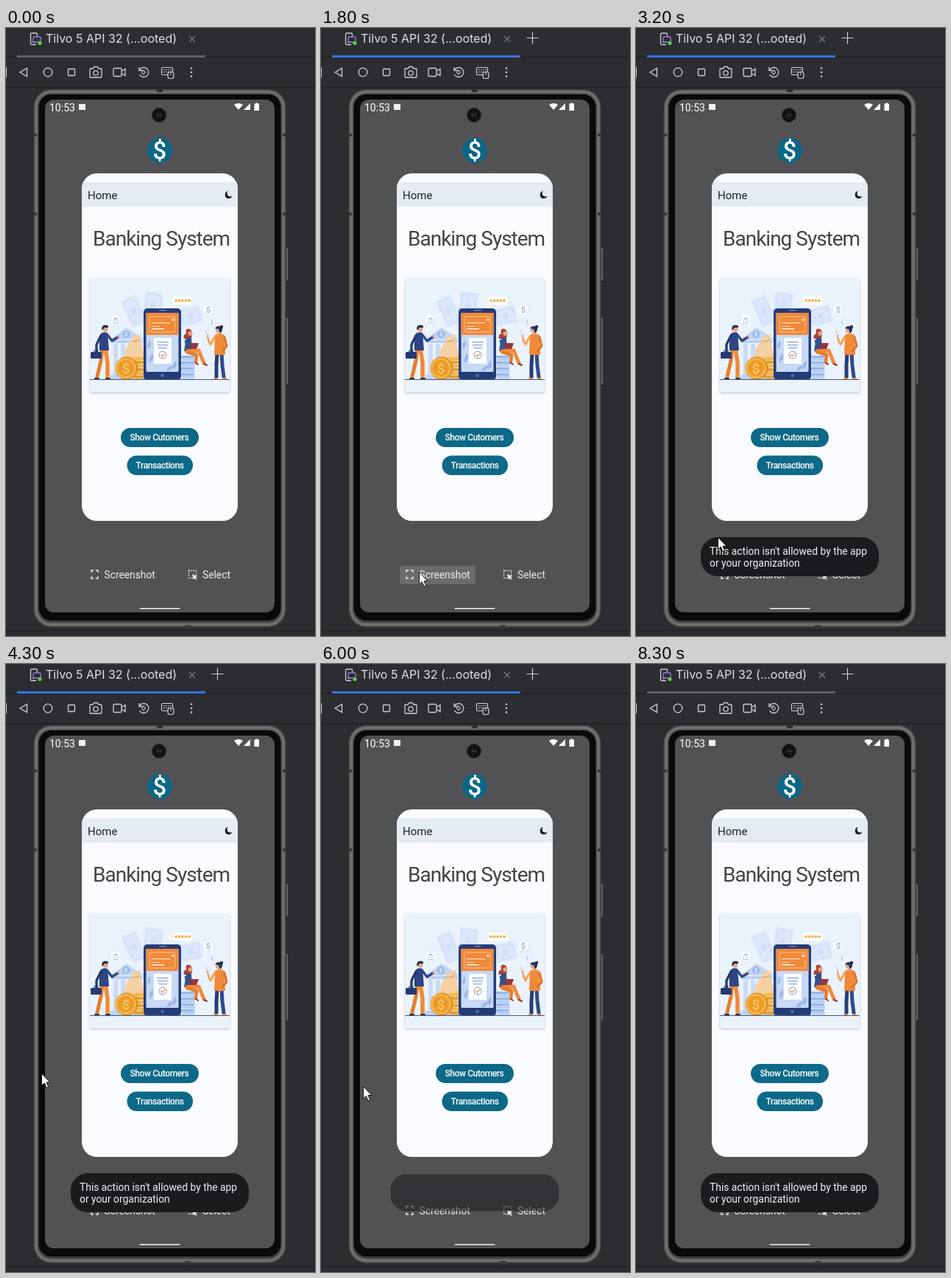
An HTML page with a canvas for the animation above (8400 ms loop, 420x824 px).

```html
<!DOCTYPE html>
<html lang="en">
<head>
<meta charset="utf-8">
<title>Emulator</title>
<style>
html, body { margin: 0; width: 100%; height: 100%; overflow: hidden; background: #2b2d30; }
canvas { display: block; width: 420px; height: 824px; }
</style>
</head>
<body>
<canvas id="stage" width="420" height="824"></canvas>
<script>
const W = 420, H = 824, LOOP = 8400, STEP = 100;
const ROBOTO = 'Roboto, "Noto Sans", sans-serif';
const INTER = 'Inter, "Noto Sans", sans-serif';
const NAVY = '#263c78', ORANGE = '#f08a3a', GOLD = '#f2a630', SKIN = '#e8a282';
const view = document.getElementById('stage').getContext('2d');
const backdrop = document.createElement('canvas');
backdrop.width = W;
backdrop.height = H;
let c = backdrop.getContext('2d');

const clamp = v => Math.max(0, Math.min(1, v));
const smooth = v => v * v * (3 - 2 * v);

function paint(fill, stroke, width = 1) {
  if (fill) { c.fillStyle = fill; c.fill(); }
  if (stroke) { c.strokeStyle = stroke; c.lineWidth = width; c.stroke(); }
}
function box(x, y, w, h, r, fill, stroke, width) {
  c.beginPath();
  c.roundRect(x, y, w, h, r);
  paint(fill, stroke, width);
}
function disc(x, y, r, fill, stroke, width) {
  c.beginPath();
  c.arc(x, y, r, 0, 7);
  paint(fill, stroke, width);
}
function shape(d, fill, stroke, width) {
  const p = new Path2D(d);
  if (fill) { c.fillStyle = fill; c.fill(p); }
  if (stroke) { c.strokeStyle = stroke; c.lineWidth = width || 1; c.stroke(p); }
}
function text(s, x, y, font, color, align = 'left', spacing = 0) {
  c.font = font;
  c.fillStyle = color;
  c.textAlign = align;
  c.letterSpacing = spacing + 'px';
  c.fillText(s, x, y);
}
function turned(x, y, angle, draw) {
  c.save();
  c.translate(x, y);
  c.rotate(angle);
  draw();
  c.restore();
}

function drawIde() {
  box(0, 0, W, H, 0, '#2b2d30');
  for (const y of [39, 80, 816]) box(0, y, W, 1.3, 0, '#1e1f22');

  // device tab
  shape('M41 22.5H35Q33.500 22.5 33.500 21V8.500Q33.500 7 35 7H41Q42.500 7 42.500 8.500V11', null, '#ced0d6', 1.3);
  box(36, 18.500, 4, 1.3, 0, '#ced0d6');
  box(37, 12, 10, 7, 1, '#2b2d30', '#9a78e0', 1.3);
  disc(46, 20.500, 2.6, '#57d13f');
  text('Tilvo 5 API 32 (...ooted)', 54, 20, '16px ' + INTER, '#dfe1e5');
  shape('M249 11l8 8m0-8l-8 8', null, '#777a80', 1.2);

  // toolbar
  const ink = '#ced0d6';
  box(0, 53, 1, 14, 0, ink);
  shape('M19 60L28.500 54.500V65.500Z', null, ink, 1.3);
  disc(57, 60, 5.8, null, ink, 1.3);
  box(84.5, 55.5, 9, 9, 1, null, ink, 1.3);
  shape('M115 55H118L120 52.500H124L126 55H129Q130 55 130 56V66Q130 67 129 67H115Q114 67 114 66V56Q114 55 115 55Z', null, ink, 1.3);
  disc(122, 61, 3.2, null, ink, 1.3);
  box(146, 54.5, 11, 11, 1.5, null, ink, 1.3);
  shape('M157 58.500L162 55.500V64.500L157 61.500', null, ink, 1.3);
  shape('M181 53V57.500H185.500M181.500 57A6.500 6.500 0 1 1 181.500 63', null, ink, 1.3);
  shape('M187 57L189.500 60L187 63L184.500 60Z', null, ink, 1.1);
  box(211.5, 53.5, 15, 10, 1.5, null, ink, 1.2);
  for (let i = 0; i < 8; i++) box(214 + i % 4 * 3, 56 + (i >> 2) * 3, 1.5, 1.3, 0, ink);
  box(220, 59.5, 8, 9, 3, '#2b2d30', ink, 1.2);
  shape('M224 60V64', null, ink);
  for (const y of [54.5, 60, 65.5]) disc(252, y, 1.3, ink);
}

function drawPhone() {
  for (const [y, h] of [[298, 44], [393, 90]]) {
    box(379, y, 4, h, 1, '#6a6b6c');
    box(380, y + 1, 1.3, h - 2, 0, '#292a2c');
  }
  // rounded metal rim: dark at both edges, bright between
  const rim = 7;
  for (let i = 0; i < rim; i += .5) {
    const v = Math.round(52 + 62 * Math.sin(Math.PI * (i + .5) / (rim + .5)));
    box(37.5 + i, 83 + i, 343 - 2 * i, 729 - 2 * i, 24 - i, `rgb(${v},${v},${v})`);
  }
  box(44.5, 90, 329, 713, 17, '#0a0a0b');
  for (const y of [143, 250]) for (const x of [38, 376]) box(x, y, 4, 4, 0, '#38393a');
  box(205, 83, 8, 4, 0, '#303132');
  box(243, 809, 8, 5, 0, '#38393a');
  box(53, 97, 312, 695, 12, '#525255');

  // status bar
  text('10:53', 59, 112.5, '14px ' + ROBOTO, '#fff');
  box(99, 103, 9, 8, 0, '#f2f2f2');
  shape('M310 104Q316 100 322 104L316 111Z', '#fff');
  shape('M332 102V111H323Z', '#fff');
  shape('M339.500 101.500H342V102.500H344V112H337.500V102.500H339.500Z', '#fff');
  disc(208, 118, 9.5, '#101113', '#29292b', 1);
  disc(208, 118, 5, '#18191b');
  disc(206, 118, 1, '#4b4c50');
  disc(210, 118, 1, '#3f4044');

  disc(209, 166, 17, '#0c6685');
  text('$', 209, 177.5, '500 33px ' + ROBOTO, '#fff', 'center');
  box(181.5, 786, 55, 1.6, .8, '#f1f1f1');
}

function bill(x, y, w, h, angle) {
  turned(x, y, angle, () => {
    box(-w / 2, -h / 2, w, h, 1, '#dbe7fa');
    box(-w / 2 + 3, -h / 2 + 3, w - 6, h - 6, 1, null, '#cddcf6', .8);
    disc(0, 0, 4, '#d0dff7');
  });
}

function drawScenery() {
  bill(174, 384, 22, 40, -.42);
  bill(200, 376, 25, 36, .12);
  bill(251, 390, 29, 24, -.22);

  // bank
  shape('M142 422L164 406L188 422Z', '#c1d5f5');
  box(144, 423, 42, 4, 0, '#b9cff2');
  for (let x = 146; x < 186; x += 10) box(x, 428, 6, 42, 0, '#cbdbf7');
  box(142, 470, 46, 6, 0, '#bcd1f3');
  disc(163, 415, 5, '#96b6eb');
  text('$', 163, 418, '500 8px ' + ROBOTO, '#fff', 'center');

  // bubbles
  disc(149, 396, 8, '#fafcff', '#dce8f8');
  shape('M145 395L149 392L153 395ZM146 396H147V399H146ZM149 396H150V399H149ZM152 396H153V399H152ZM145 400H153V401H145Z', '#a9c3ee');
  for (const [x, y, r] of [[275, 382, 8], [280, 399, 5], [272, 413, 4]]) {
    disc(x, y, r, '#f8fbff', '#dce8f8');
    text('$', x, y + r * .5, `500 ${r * 1.4}px ${ROBOTO}`, '#91b3e8', 'center');
  }
  box(227, 364, 26, 11, 2, '#fff');
  for (let i = 0; i < 5; i++) {
    const x = 231 + i * 4.5;
    shape(`M${x} 367l.8 1.5 1.500.2-1.100 1.200.3 1.700-1.500-.8-1.500.8.3-1.700-1.100-1.200 1.500-.2z`, GOLD);
  }

  // money bag and coins
  shape('M171 416L177 418L184 414L182 422Q188 436 187 448H161Q161 431 171 424Z', '#f4d0a4');
  shape('M171 424Q176 426 182 422', null, '#d69a60', 1.3);
  for (let i = 0; i < 6; i++) box(174, 446 + i * 5, 13, 4.3, 1, i % 2 ? '#eaa02c' : '#f6b846');
  disc(164, 461, 15.5, '#dd8e28');
  disc(163, 461, 14, '#f7b544');
  disc(163, 461, 11, '#e99b2b');
  text('$', 163, 468, '500 19px ' + ROBOTO, '#f9c660', 'center');
  for (let i = 0; i < 8; i++) box(238 + i % 2, 444 + i * 4, 18, 3.4, 1, i % 2 ? '#b8cff3' : '#98b8eb');

  // giant handset
  box(187, 380, 51, 97, 5, NAVY);
  box(190.5, 386, 44, 80, 1, '#c7d9f4');
  box(190.5, 386, 44, 30, 0, ORANGE);
  box(195, 391, 35, 21, 2, null, '#fad0a7', .8);
  box(198, 399, 25, 1.2, 0, '#ffe0c0');
  box(198, 404, 11, 1, 0, '#ffe0c0');
  box(198, 407, 17, 1.3, 0, '#fff');
  box(225, 394, 4, 3, 1, '#ffd7a8');
  shape('M195 454Q194 445 199 441Q202 449 195 454M228 463Q225 455 231 451Q233 459 228 463M193 435Q191 426 196 424Q198 431 193 435M218 465Q220 458 228 457Q226 464 218 465', '#98b7e9');
  box(201, 420, 24, 35, 0, '#fbfdff');
  for (let i = 0; i < 3; i++) box(205 + i, 425 + i * 4, 16 - i * 2, 1.3, 0, '#87a9df');
  disc(213, 443, 5, '#fff', '#677da8', .8);
  shape('M210.500 443L212.500 445L216 440.500', null, ORANGE, 1.2);
  disc(212.5, 471, 2.2, '#5371b5');
  box(208, 382, 10, 1.2, 0, '#7089c2');
}

function drawPeople() {
  c.lineCap = c.lineJoin = 'round';

  // man with briefcase
  shape('M131 434L129 451L124 472', null, '#e67d2d', 5);
  shape('M135 434L138 453L138 472', null, ORANGE, 5.5);
  shape('M121 475H126M136 475H141', null, '#253355', 2.2);
  shape('M129 414Q133 411 138 413L140 437H127Q126 422 129 414Z', '#2d4584');
  shape('M138 416L144 424L152 419', null, '#2d4584', 3.3);
  shape('M129 417L123 429L123 438', null, '#233768', 3.3);
  disc(153, 418, 1.7, SKIN);
  box(115, 439, 15, 9, 1.5, '#243a72');
  shape('M120 439V437H125V439', null, '#243a72', 1.2);
  disc(135, 408, 3.5, SKIN);
  shape('M130.500 410Q129 402.500 135 402.500Q140 402.500 139 406L134 406Z', '#263052');

  // seated woman with laptop
  shape('M245 414Q243 406 250 408Q255 411 252 421H244Q240 422 242 416Z', '#ad4434');
  disc(250.500, 414, 3, SKIN);
  shape('M245 420Q249 418 252 421L253 438H242Z', '#31528e');
  shape('M246 438L262 437L269 454', null, ORANGE, 4.8);
  shape('M246 439L259 443L258 453', null, '#e57c30', 4.5);
  shape('M269 455L273 457M258 454L261 456', null, '#93303a', 2);
  shape('M250 427L262 427L259 435L247 435Z', '#98343f');
  shape('M244 424L246 432L252 431', null, '#31528e', 2.6);

  // standing woman
  shape('M287 440L286 457L286 473', null, NAVY, 5);
  shape('M293 440L294 457L296 473', null, '#30498b', 5);
  shape('M283 475H287M295 475H299', null, ORANGE, 2);
  shape('M284 416Q290 412 297 416L298 443H283Z', ORANGE);
  shape('M284 418L278 429L275 423', null, '#f5a154', 2.8);
  shape('M297 419L300 431L294 438', null, '#dd762d', 3.2);
  disc(275, 421, 1.6, SKIN);
  box(273, 415, 2.2, 5, .5, '#f0a45e');
  shape('M289 410V415', null, SKIN, 2.6);
  disc(288, 409, 3.4, SKIN);
  shape('M284 407Q287 402 293 405Q296 409 291 414L289 408Z', '#263052');
  disc(293, 405, 2.2, '#263052');
  c.lineCap = 'butt';
  c.lineJoin = 'miter';
}

function drawApp() {
  c.save();
  box(103, 197, 212, 471, 20.5, '#fafbff');
  c.clip();
  box(103, 209, 212, 33, 0, '#e4ebf1');
  c.restore();
  text('Home', 111, 231.5, '15px ' + ROBOTO, '#202124');
  shape('M302 221A5 5 0 1 0 307.500 227.500A4 4 0 0 1 302 221Z', '#181a1e');
  text('Banking System', 118, 295, '28px ' + ROBOTO, '#444449', 'left', -1);

  c.save();
  c.shadowColor = 'rgba(30,40,60,.3)';
  c.shadowBlur = 3;
  c.shadowOffsetY = 1;
  box(114, 339, 190, 155, 3, '#eaf3fb');
  c.restore();
  drawScenery();
  drawPeople();
  box(114, 476, 190, 1, 0, '#465777');

  box(156, 542, 106, 26, 13, '#0d6987');
  box(164.5, 579.5, 89.5, 26.5, 13, '#0d6987');
  const font = '500 12px ' + ROBOTO;
  text('Show Cutomers', 168.5, 559, font, '#fff', 'left', -.4);
  text('Transactions', 176.5, 597, font, '#fff', 'left', -.4);
}

function drawActions(press) {
  if (press > 0) box(107, 729, 103, 25, 3, `rgba(255,255,255,${.3 * press})`);
  const ink = '#eeeeef';
  shape('M116 738V735H119M122 735H125V738M125 743V746H122M119 746H116V743', null, ink, 1.4);
  text('Screenshot', 133.5, 745.5, '13.8px ' + ROBOTO, ink);
  c.setLineDash([1.6, 1.4]);
  c.strokeStyle = ink;
  c.lineWidth = 1.3;
  c.strokeRect(248.5, 735.5, 10, 10);
  c.setLineDash([]);
  shape('M253 740L260 743L257 744L259.500 747L258.500 748L256 745L255 747.500Z', ink);
  text('Select', 267, 745.5, '13.8px ' + ROBOTO, ink);
}

// background, words and scale run on separate clocks
function toastState(t) {
  const enter = start => {
    const age = t - start, s = Math.cbrt(clamp(age / 333));
    return { scale: .9 + .1 * smooth(s), alpha: clamp(age / 66), words: clamp((age - 50) / 66) };
  };
  if (t >= 5964) return enter(5964);
  if (t >= 5660) {
    const age = t - 5660, p = clamp(age / 250);
    return { scale: 1 - .1 * p * p, alpha: 1 - clamp((age - 150) / 100), words: 1 - clamp(age / 66) };
  }
  return enter(1950);
}

function drawToast({ scale, alpha, words }) {
  if (alpha <= 0) return;
  c.save();
  c.translate(209, 716.5);
  c.scale(scale, scale);
  c.translate(-209, -716.5);
  c.globalAlpha = alpha;
  box(88, 690, 242, 53, 23, '#1b1b1f');
  c.globalAlpha = alpha * words;
  const font = '13.85px ' + ROBOTO;
  text("This action isn't allowed by the app", 100, 714, font, '#f1f0f4');
  text('or your organization', 100, 730, font, '#f1f0f4');
  c.restore();
}

const route = [
  [100, 28, 560], [700, 133.5, 737.5], [2900, 133.5, 737.5], [3800, 48.5, 555], [5700, 48.5, 555],
  [6000, 57.5, 572.5], [6500, 99.5, 716.5], [6700, 97, 723], [6800, 97, 723], [7400, 46, 215]
];

function drawCursor(t) {
  if (t < 200 || t >= 7400) return;
  const i = route.findIndex(k => k[0] > t);
  const [t0, x0, y0] = route[i - 1], [t1, x1, y1] = route[i];
  const p = smooth((t - t0) / (t1 - t0));
  c.save();
  c.translate(x0 + (x1 - x0) * p, y0 + (y1 - y0) * p);
  shape('M0 0V16.500L3.800 13L6.500 19.300L9.200 18.200L6.500 12H11.500Z', '#fff', '#111', 1);
  c.restore();
}

function render(t) {
  c.drawImage(backdrop, 0, 0);
  box(15, 37, 256, 3, 0, t >= 1800 && t < 8000 ? '#3574f0' : '#5d6066');
  if (t >= 100) shape('M279.500 13.500H295.500M287.500 5.500V21.500', null, '#ced0d6', 1.2);
  drawActions(clamp((t - 1700) / 200) * (1 - clamp((t - 2900) / 300)));
  drawToast(toastState(t));
  drawCursor(t);
}

drawIde();
drawPhone();
drawApp();
c = view;

const begin = performance.now();
function tick() {
  const t = (performance.now() - begin) % LOOP;
  render(Math.floor(t / STEP) * STEP);
  requestAnimationFrame(tick);
}
tick();
</script>
</body>
</html>
```
